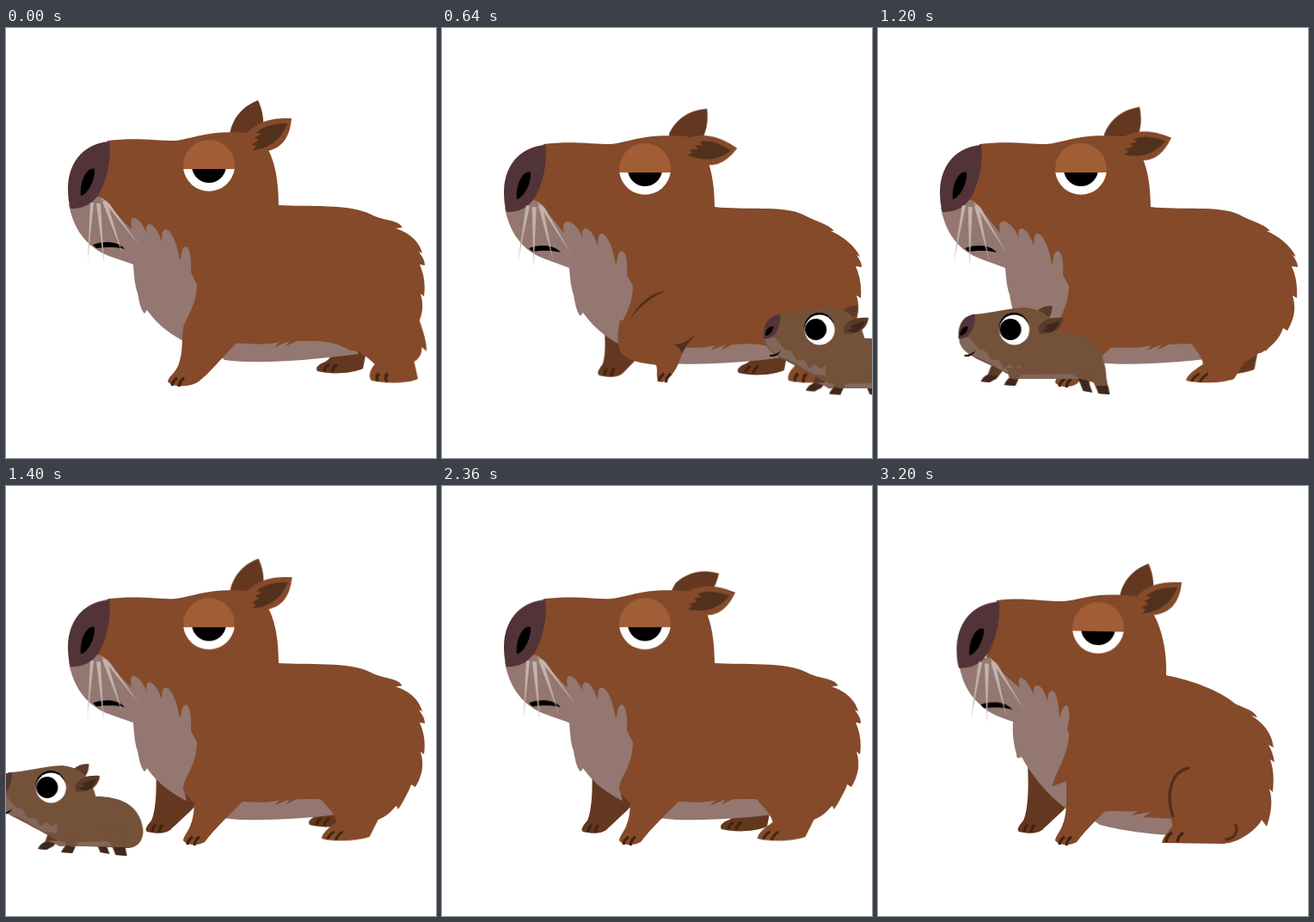
Recreate the animation shown at these times as an HTML page without scripts. Size 500 px wide and 500 px high, loop 3.88 s.

```html
<!DOCTYPE html>
<html lang="en">
<head>
<meta charset="utf-8">
<title>Capybara walk</title>
<style>
html, body { margin: 0; width: 100%; height: 100%; overflow: hidden; background: #fff; }
svg { display: block; width: 100vw; height: 100vh; }

.brown { fill: #844a2a; }
.dark { fill: #643820; }
.inner { fill: #51301c; }
.mauve { fill: #937770; }
.purple { fill: #523338; }
.lid { fill: #a05d36; }
.white { fill: #fff; }
.hair { fill: #c3b3af; }
.toe { fill: none; stroke: #42240f; stroke-width: 3.4; }
.fold { fill: none; stroke: #51301c; stroke-width: 3.4; stroke-linecap: round; }
.pup { fill: #745139; }
.pup-dark { fill: #5a3a28; }
.pup-light { fill: #80675a; }
.pup-foot { fill: #40271b; }

.torso, .throat, .belly, .face, .ear, .far-ear, .whiskers,
.fore, .fore-toes, .far-fore, .hind, .far-hind, .bend, .stand, .sit, .baby {
  animation: 3.88s linear infinite;
}
.torso { animation-name: torso; }
.throat { animation-name: throat; }
.belly { animation-name: belly; }
.face { animation-name: face; transform-origin: 236px 160px; }
.whiskers { animation-name: whiskers; transform-origin: 106px 202px; }
.ear { animation-name: ear; transform-origin: 284px 140px; }
.far-ear { animation-name: far-ear; transform-origin: 282px 135px; }
.torso, .throat, .belly, .face, .whiskers, .ear, .far-ear { animation-timing-function: ease-in-out; }
.fore { animation-name: fore; }
.fore-toes { animation-name: fore-toes; }
.far-fore { animation-name: far-fore; transform-origin: 0 335px; }
.hind { animation-name: hind; transform-origin: 0 330px; }
.far-hind { animation-name: far-hind; }
.bend { animation-name: bend; }
.stand { animation-name: stand; }
.sit { animation-name: sit; }
.baby { animation-name: baby; }

/* head bob: up and down every 480 ms, then sitting */
@keyframes torso {
  0%, 12.4%, 24.7%, 37.1%, 49.5%, 61.9% { d: path("M118 131C150 127 175 131 195 131C220 129 230 118 285 122C308 132 317 165 317 206C350 208 400 204 425 217C440 225 455 222 461 232L453 233C466 237 480 246 484 262L480 260C484 266 487 270 487 276L481 275C486 286 488 298 486 312L482 309C487 325 483 338 476 350L471 347C467 361 456 372 445 378L400 375C380 362 360 364 338 364L325 370L330 364L312 371L318 365C300 370 280 366 262 367L222 372L206 356L165 300L140 240L105 198Z"); }
  6.2%, 16.5%, 18.6%, 30.9%, 42.3%, 43.3%, 55.7% { d: path("M118 135C150 131 175 135 195 135C220 133 230 122 285 126C308 136 317 169 317 208C350 212 398 206 420 217C436 226 448 227 456 236L452 236C466 242 480 253 486 266L482 264C486 270 488 273 488 278L481 277C486 288 488 300 487 314L482 311C487 327 483 340 476 352L471 349C467 362 456 372 445 378L400 377C380 367 360 366 338 368L325 374L330 368L312 375L318 369C300 374 280 370 266 372L222 374L206 356L165 300L140 244L105 202Z"); }
  71.1%, 73.2% { d: path("M130 146C165 140 185 142 205 142C230 136 240 126 295 130C320 150 329 185 329 218C362 225 390 230 411 249C422 256 435 260 439 270L433 268C447 275 458 288 460 304L454 301C458 308 460 314 461 321L456 318C461 332 460 345 459 356L455 352C459 365 458 378 452 396L446 388C444 395 425 412 408 415L345 414C344 400 342 395 341 387L308 385L318 379L295 383L302 378C290 379 280 378 268 378L225 385L205 350L185 310L165 262L122 216Z"); }
  82.5%, 100% { d: path("M138 133C170 129 195 135 215 134C238 133 245 123 300 128C325 140 337 185 335 220C365 226 398 238 415 253C424 258 437 260 441 269L434 267C448 275 458 288 460 304L454 301C458 308 460 314 461 321L456 318C461 332 460 345 459 356L455 352C459 365 458 378 452 396L446 388C444 395 425 412 408 415L345 414C344 400 342 395 341 387L308 385L318 379L295 383L302 378C290 379 280 378 268 378L225 385L205 350L185 310L165 252L125 205Z"); }
}
@keyframes throat {
  0%, 12.4%, 24.7%, 37.1%, 49.5%, 61.9% { d: path("M73 205C78 230 88 245 103 256C112 264 130 268 148 275C149 290 150 300 153 308C155 320 157 328 161 332L164 328C178 348 195 358 210 366L208 358L206 352C206 340 222 325 222 298L215 284C216 268 214 255 209 254C203 256 205 264 202 270C199 250 192 234 185 234C180 236 182 244 181 248C177 236 172 228 166 228C162 230 163 236 164 240C160 228 152 219 147 221C144 224 146 230 146 234C135 224 122 208 108 196Z"); }
  6.2%, 16.5%, 18.6%, 30.9%, 42.3%, 43.3%, 55.7% { d: path("M73 209C78 234 88 249 103 260C112 267 130 272 148 279C149 292 150 302 153 310C155 322 157 331 161 335L164 331C178 351 195 362 210 370L208 360L206 354C206 342 222 327 222 300L215 287C216 272 214 260 209 259C203 261 205 269 202 275C199 255 192 239 185 239C180 241 182 249 181 253C177 241 172 233 166 233C162 235 163 241 164 245C160 233 150 223 144 225C139 228 142 234 142 238C133 228 122 212 108 200Z"); }
  71.1%, 73.2% { d: path("M90 225C97 250 105 260 119 271C130 279 140 281 158 285C157 297 158 305 161 314C161 316 162 317 165 316L167 315C178 335 195 358 220 376L220 343L203 349C201 335 225 312 225 292L222 288C226 275 225 262 221 260C215 262 213 268 211 274C209 255 205 244 200 245C195 247 197 253 196 257C194 246 189 239 184 240C179 242 181 247 181 251C176 241 168 234 162 236C158 238 160 243 161 247C150 240 135 222 126 212Z"); }
  82.5%, 100% { d: path("M94 207C98 230 108 246 121 256C130 265 142 269 157 274C156 290 158 300 161 312C161 316 162 317 165 316L167 315C178 335 195 358 220 376L220 343L203 349C205 335 222 312 222 288L220 282C224 270 223 257 219 255C213 258 213 264 211 270C210 250 207 238 202 238C197 240 198 246 197 250C194 238 189 231 184 232C180 234 181 239 181 243C177 232 170 222 165 223C162 226 164 231 165 234C155 228 138 210 128 199Z"); }
}
@keyframes belly {
  0%, 12.4%, 24.7%, 37.1%, 49.5%, 61.9% { d: path("M225 355L254 386C290 391 350 387 410 379L395 355Z"); }
  6.2%, 16.5%, 18.6%, 30.9%, 42.3%, 43.3%, 55.7% { d: path("M225 355L254 389C290 393 350 390 410 381L395 355Z"); }
  71.1%, 100% { d: path("M215 365L258 394C285 401 315 405 342 406L345 375Z"); }
}
@keyframes face {
  0%, 12.4%, 24.7%, 37.1%, 49.5%, 61.9% { transform: translate(0, 0) rotate(0deg); }
  6.2%, 16.5%, 18.6%, 30.9%, 42.3%, 43.3%, 55.7% { transform: translate(0, 4px) rotate(0deg); }
  71.1%, 73.2% { transform: translate(11px, 8.5px) rotate(-3deg); }
  82.5%, 100% { transform: translate(20px, 5px) rotate(1.2deg); }
}
@keyframes whiskers {
  0%, 12.4%, 24.7%, 37.1%, 49.5%, 61.9% { transform: rotate(0deg); }
  6.2%, 16.5%, 18.6%, 30.9%, 42.3%, 43.3%, 55.7% { transform: rotate(6deg); }
  71.1%, 73.2% { transform: rotate(-2deg); }
  82.5%, 100% { transform: rotate(4deg); }
}
@keyframes ear {
  0%, 12.4%, 24.7%, 37.1%, 49.5%, 82.5%, 100% { transform: rotate(0deg); }
  6.2%, 30.9%, 55.7%, 60.8% { transform: rotate(20deg); }
  16.5% { transform: rotate(32deg); }
  42.3% { transform: rotate(24deg); }
  67% { transform: rotate(-16deg); }
  73.2% { transform: rotate(-11deg); }
}
@keyframes far-ear {
  0%, 12.4%, 24.7%, 37.1%, 49.5%, 82.5%, 100% { transform: rotate(0deg); }
  6.2%, 30.9%, 42.3% { transform: rotate(13deg); }
  16.5% { transform: rotate(18deg); }
  55.7% { transform: rotate(25deg); }
  60.8% { transform: rotate(38deg); }
  67%, 73.2% { transform: rotate(-9deg); }
}

/* walk: one stride is 960 ms */
@keyframes fore {
  0%, 18%, 24.7%, 42.3%, 49.5% { d: path("M207 345C203 362 207 375 200 393C196 402 189 405 188 411C192 418 215 418 224 411C236 402 248 387 268 366L290 340Z"); }
  6.2%, 12.4%, 30.9%, 37.1%, 55.7%, 100% { d: path("M219 343C219 365 220 380 215 393C212 402 207 406 206 412C210 419 227 418 232 413C240 402 252 390 275 367L295 340Z"); }
  16.5%, 41.2% { d: path("M207 340C203 360 203 372 211 381C225 390 240 390 249 392C252 401 246 409 256 412C268 406 274 395 279 379C278 372 284 370 296 358L300 340Z"); }
}
@keyframes fore-toes {
  0%, 18%, 24.7%, 42.3%, 49.5% { transform: translate(0, 0); }
  6.2%, 12.4%, 30.9%, 37.1%, 55.7%, 100% { transform: translate(18px, 1px); }
  16.5%, 41.2% { transform: translate(60px, -5px); }
}
@keyframes bend {
  0%, 14.4%, 17.6%, 39.6%, 42.2%, 100% { opacity: 0; }
  15.5%, 17%, 40.6%, 41.6% { opacity: 1; }
}
@keyframes far-fore {
  0%, 24.7%, 49.5% { transform: translate(30px, 0) skewX(5deg); }
  5.2%, 29.9%, 53% { transform: translate(44px, -3px) skewX(10deg); }
  8.3%, 33%, 56.7% { transform: translate(20px, -9px) skewX(0deg); }
  11.3%, 36.1%, 60.3%, 100% { transform: translate(0, 0) skewX(0deg); }
  16.5% { transform: translate(13px, 2px) skewX(5deg); }
  42.3% { transform: translate(20px, 0) skewX(4deg); }
}
@keyframes hind {
  0%, 24.7%, 49.5% { transform: skewX(20.6deg); }
  3.6%, 28.4%, 53.1% { transform: translateY(-7px) skewX(-6deg); }
  6.2%, 30.9%, 55.7% { transform: skewX(-24.8deg); }
  11.3%, 36.1%, 60.8% { transform: skewX(-19.3deg); }
  16.5% { transform: skewX(5.7deg); }
  42.3% { transform: skewX(10.6deg); }
  67%, 100% { transform: skewX(-36deg); }
}
@keyframes far-hind {
  0%, 24.7%, 49.5% { transform: translate(37px, 0); }
  6.2%, 30.9%, 55.7% { transform: translate(60px, 1px); }
  8.8%, 33.5%, 58.2% { transform: translate(40px, -7px); }
  13.4%, 16.5% { transform: translate(20px, 2px); }
  18.6%, 42.3%, 60.8%, 100% { transform: translate(0, 0); }
}
@keyframes stand {
  0%, 67.99% { opacity: 1; }
  68%, 100% { opacity: 0; }
}
@keyframes sit {
  0%, 67.99% { opacity: 0; }
  68%, 100% { opacity: 1; }
}

/* the young one runs through, stretching and gathering */
@keyframes baby {
  0%, 8.25% { transform: translateX(441px); }
  30.93% { transform: translateX(0); }
  44.33%, 100% { transform: translateX(-276px); }
}
.trunk, .front, .back, .under { animation: .194s ease-in-out .03s infinite alternate; }
.trunk { animation-name: trunk; }
.front { animation-name: front; }
.back { animation-name: back; }
.under { animation-name: under; }
@keyframes trunk {
  from { d: path("M110 333C132 332 148 326 172 325C192 327 206 338 213 355C240 355 256 364 262 385C266 396 267 408 262 412C250 414 240 408 232 407L166 408C150 400 135 394 118 386C98 376 94 368 95 358Z"); }
  to { d: path("M110 333C132 332 148 326 172 325C192 327 206 338 211 361C240 361 260 371 265 394C269 408 262 420 250 421C242 421 234 420 226 420L176 418C156 406 135 395 118 386C98 376 94 368 95 358Z"); }
}
@keyframes front { to { transform: translate(24px, 11px); } }
@keyframes back { to { transform: translate(-23px, 4px); } }
@keyframes under { to { transform: translate(6px, 11px); } }
</style>
</head>
<body>
<svg viewBox="0 0 500 500">
  <!-- far side -->
  <g class="stand"><g class="far-hind">
    <path class="dark" d="M335 350C345 375 342 384 334 388C326 391 322 395 325 399C340 403 365 402 378 396L384 365Z"/>
    <path class="toe" d="M333 399Q334 393 339 391M342 400Q343 394 348 391"/>
  </g></g>
  <g class="far-fore">
    <path class="dark" d="M174 325C176 360 173 380 169 389C163 396 161 400 164 402C176 405 186 404 191 400C199 392 213 380 220 372L216 330Z"/>
    <path class="toe" d="M170 402Q171 396 174 394M178 403Q179 397 182 394"/>
  </g>
  <g class="face"><path class="far-ear dark" d="M260 124C263 105 275 91 293 84C298 95 300 105 299 116L290 140L262 135Z"/></g>

  <!-- body -->
  <path class="belly mauve"/>
  <path class="torso brown"/>
  <path class="throat mauve"/>
  <g class="stand"><g class="hind">
    <path class="brown" d="M355 340C374 366 398 376 406 391C399 397 393 404 395 410C412 414 438 413 450 408L453 388C461 384 466 378 468 371L472 376C476 366 477 352 477 335Z"/>
    <path class="toe" d="M402 411Q402 405 407 402M412 412Q412 405 417 402"/>
  </g></g>
  <g class="sit">
    <path class="brown" d="M345 385C346 398 333 402 330 415L402 416C425 412 440 398 446 386L400 350Z"/>
    <path class="fold" d="M361 328C341 332 334 358 343 384M405 411C415 410 419 402 416 394"/>
    <path class="toe" d="M335 414Q336 406 342 403M348 414Q349 407 355 403"/>
  </g>
  <path class="fore brown"/>
  <g class="fore-toes"><path class="toe" d="M193 416Q194 410 199 407M201 417Q202 410 207 407"/></g>
  <g class="bend inner">
    <path d="M219 338C228 321 243 307 260 306C245 312 232 322 219 338Z"/>
    <path d="M268 367Q277 371 296 356Q285 366 279 379Q277 371 268 367Z"/>
  </g>

  <!-- face -->
  <g class="face">
    <path class="purple" d="M120 132C94 134 73 152 72 186C72 195 73 204 75 210C96 210 107 200 114 180C120 164 122 146 120 132Z"/>
    <path d="M103 164C95 160 85 178 87 195C94 194 104 178 103 164Z"/>
    <path d="M101 252C114 247 131 248 138 257C127 254 114 255 105 256Z"/>
    <g class="whiskers hair">
      <path d="M98 203L95 271L102 203Z"/>
      <path d="M105 204L114 274L110 204Z"/>
      <path d="M112 202L136 264L117 201Z"/>
      <path d="M109 196L156 254L120 204Z"/>
    </g>
    <circle class="lid" cx="236" cy="160" r="30"/>
    <path class="white" d="M206.300 164A30 30 0 0 0 265.700 164Z"/>
    <path d="M216.400 164A20 20 0 0 0 255.600 164Z"/>
    <g class="ear">
      <path class="brown" d="M277 126C290 109 308 104 332 105C330 130 318 146 288 144Z"/>
      <path class="inner" d="M327 111C307 111 297 116 291 122L297 123L289 128L294 130L286 136L291 137L287 142C302 141 320 132 327 111Z"/>
    </g>
  </g>

  <!-- young one -->
  <g class="baby">
    <g class="front">
      <path class="pup-dark" d="M133 390L149 394L138 408L130 412L120 411Q122 405 128 403Z"/>
      <path class="pup-foot" d="M128 403L140 405L130 412L120 411Z"/>
    </g>
    <path class="back pup-foot" d="M228 400L244 400L247 416L250 424L239 422L235 412Z"/>
    <path class="pup-dark" d="M182 336C184 327 192 323 203 323C203 331 201 337 194 342Z"/>
    <path class="trunk pup"/>
    <path class="pup-light" d="M95 359C96 372 106 381 121 385C134 391 141 397 150 402L166 404L166 392L160 396L153 391L147 396L141 386L132 386L126 376L118 373L107 360Z"/>
    <path class="under pup-light" d="M150 401L163 408L236 408L225 402L172 403Z"/>
    <g class="front">
      <path class="pup" d="M150 395L169 396L163 410L160 416L147 415Q149 409 153 407Z"/>
      <path class="pup-foot" d="M153 407L163 409L160 416L147 415Z"/>
    </g>
    <g class="back">
      <path class="pup" d="M240 396L264 394L267 412L270 426L257 425L252 414Z"/>
      <path class="pup-foot" d="M254 416L268 416L270 426L257 425Z"/>
    </g>
    <path class="purple" d="M113 333C100 334 93 344 94 361C105 363 114 350 113 333Z"/>
    <path d="M105 347C100 346 95 352 96 358C101 357 105 352 105 347Z"/>
    <path d="M101 380Q109 380 114 375Q110 383 101 382Z"/>
    <circle cx="158.500" cy="348.500" r="17.500"/>
    <circle class="white" cx="159" cy="351" r="17.500"/>
    <circle cx="154.500" cy="350.500" r="12.500"/>
    <path class="pup-dark" d="M187 348C193 338 203 336 216 337C214 350 204 357 188 355Z"/>
    <path class="pup-foot" d="M211 341C203 343 198 345 195 347L198 349L191 352L200 354C206 352 210 347 211 341Z"/>
  </g>
</svg>
</body>
</html>
```
